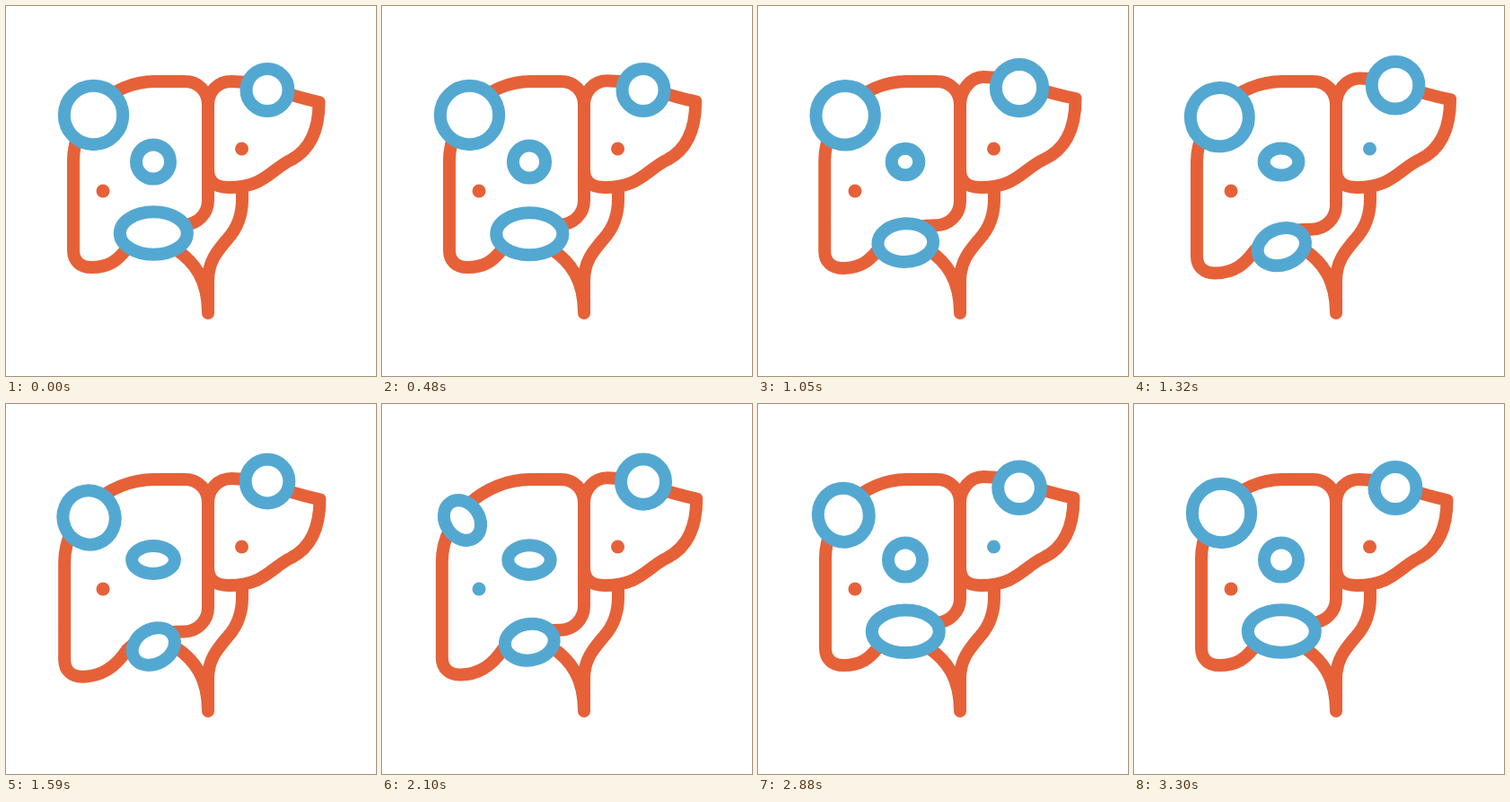
An HTML page that plays this animation: 412x412 px, repeating every 3600 ms.

```html
<!DOCTYPE html>
<html lang="en">
<head>
<meta charset="utf-8">
<title>Liver</title>
<style>
  html, body { margin: 0; height: 100%; overflow: hidden; background: #fff; }
  svg { display: block; width: 100vw; height: 100vh; stroke-width: 14; stroke-linecap: round; stroke-linejoin: round; }
  .organ { fill: none; stroke: #e66138; }
  .cell { fill: #fff; stroke: #53a8d2; }
</style>
</head>
<body>
<svg viewBox="0 0 412 412">
  <g class="organ">
    <path d="M263 203V215C263 234 257 248 247 259C236 272 225 284 225 306V342C225 305 210 285 189 271"/>
    <path id="leftLobe"/>
    <path id="rightLobe"/>
  </g>
  <circle id="leftDot" cx="108" cy="206" r="7.5"/>
  <circle id="rightDot" cx="262.5" cy="159" r="7.5"/>
  <g class="cell">
    <ellipse id="cornerCell"/>
    <ellipse id="topCell"/>
    <ellipse id="middleCell"/>
    <ellipse id="bottomCell"/>
  </g>
</svg>
<script>
const LOOP = 3600, STEP = 30, RED = '#e66138', BLUE = '#53a8d2';
const get = id => document.getElementById(id);

// Sine-eased value through [time, value] keys.
function track(t, ...keys) {
  if (t <= keys[0][0]) return keys[0][1];
  for (let i = 1; i < keys.length; i++) {
    const [t0, a] = keys[i - 1], [t1, b] = keys[i];
    if (t < t1) return a + (b - a) * (1 - Math.cos(Math.PI * (t - t0) / (t1 - t0))) / 2;
  }
  return keys[keys.length - 1][1];
}

// Rises from 0 to 1 and falls back.
const pulse = (t, start, peak, end) => track(t, [start, 0], [peak, 1], [end, 0]);

function cell(id, x, y, rx, ry, turn = 0) {
  const el = get(id);
  el.setAttribute('rx', rx);
  el.setAttribute('ry', ry);
  el.setAttribute('transform', `translate(${x} ${y}) rotate(${turn})`);
}

function drawLobes(t) {
  const k = pulse(t, 900, 1800, 2650);
  const left = 75 - 11.3 * k, low = 291 + 14.5 * k, inner = 243.5 + 11.5 * k;
  get('leftLobe').setAttribute('d', `M225 110V${inner - 27}
    C225 ${inner - 12} 213 ${inner} 198 ${inner}
    C170 ${inner} 150 ${250 + 10 * k} ${133 + 2 * k} ${272 + 2 * k}
    C124 ${283 + 8 * k} ${115 - 7 * k} ${low} ${left + 20} ${low}
    C${left + 8} ${low} ${left} ${low - 7} ${left} ${low - 19}
    V${172 + 5 * k}C${left} 125 ${118 - 4 * k} 84 165 84
    H199C214 84 225 95 225 110Z`);

  const j = pulse(t, 300, 1050, 1800) + pulse(t, 1800, 2550, 3300);
  const top = 84 - 5 * j, tipX = 348.5 + 5 * j, tipY = 107 - 4 * j;
  get('rightLobe').setAttribute('d', `M225 110C225 95 236 ${top} 251 ${top}
    C285 ${top} 300 ${96.5 - 4 * j} ${tipX} ${tipY}
    C${tipX} 138 ${338 + 4 * j} 160 318 171
    C296 181 288 202 248 202Q225 202 225 182Z`);
}

function drawCells(t) {
  const slide = pulse(t, 900, 2100, 3300), shrink = pulse(t, 1240, 2300, 3200);
  cell('cornerCell', 97.5 - 8 * slide, 121.5 + 8 * slide,
    32.7 - 15.2 * shrink, 32.7 - 9.7 * shrink, -35 * slide);

  const r = 23.5 + 3.1 * (pulse(t, 600, 1200, 1800) + pulse(t, 1800, 2400, 3000));
  cell('topCell', 291, 93.5 - 8 * pulse(t, 600, 1800, 3000), r, r);

  cell('middleCell', 164, 173.5,
    track(t, [300, 19], [900, 14.6], [1800, 25.3], [2700, 19]),
    track(t, [300, 19], [900, 14.7], [1800, 15.5], [2700, 19]));

  const squeeze = pulse(t, 300, 1800, 2700);
  cell('bottomCell', 164.3, 253 + 17 * pulse(t, 300, 1600, 3000),
    37.5 - 13.2 * squeeze, 23.7 - 4.7 * squeeze, -30 * pulse(t, 900, 1600, 2400));
}

function drawDots(t) {
  const beat = t < 300 || t >= 3300 ? 0 : (t - 300) % 1500;
  get('leftDot').setAttribute('fill', beat >= 250 && beat < 600 ? BLUE : RED);
  get('rightDot').setAttribute('fill', beat >= 850 && beat < 1200 ? BLUE : RED);
}

function frame() {
  const t = Math.floor(performance.now() % LOOP / STEP) * STEP;
  drawLobes(t);
  drawCells(t);
  drawDots(t);
  requestAnimationFrame(frame);
}
frame();
</script>
</body>
</html>
```
